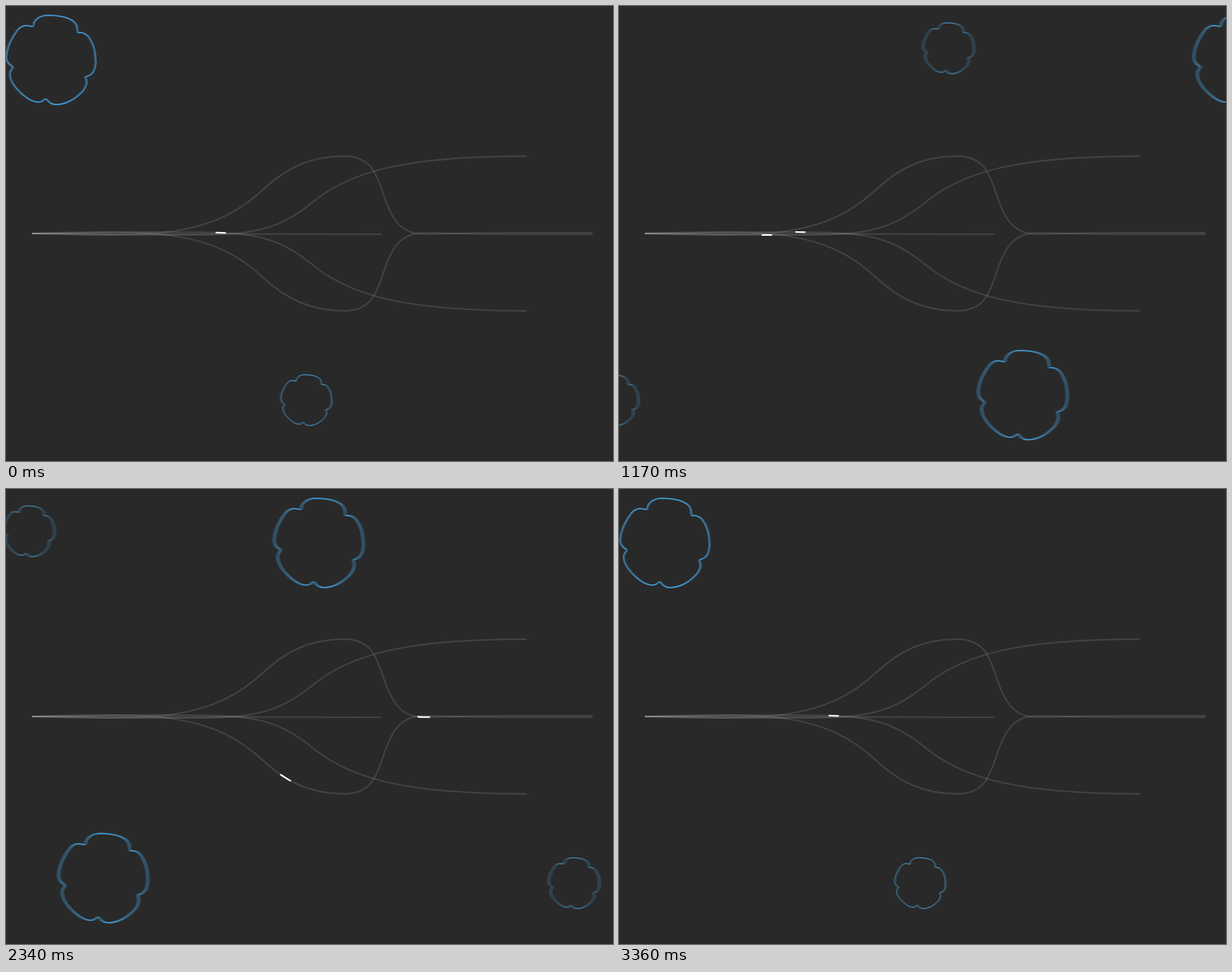
Animation, 800 px wide and 600 px high, one loop 3.39 s. Source, as an HTML page with a canvas:

```html
<!DOCTYPE html>
<html lang="en">
<head>
<meta charset="utf-8">
<title>Branching pulses</title>
<style>
html, body { margin: 0; width: 100%; height: 100%; overflow: hidden; background: #292929; }
canvas { display: block; width: 800px; height: 600px; }
</style>
</head>
<body>
<canvas id="stage" width="800" height="600"></canvas>
<script>
const ctx = document.getElementById('stage').getContext('2d');

const STEP = 30;          // ms per picture
const STEPS = 113;        // pictures per loop; the last pose equals the first
const SPAN = STEPS - 1;
const RUN = 30;           // steps a pulse needs for its track
const DASH = 0.02;        // pulse length as a share of its track
const SPEED = 10.362;     // blob drift in px per step
const WRAP = SPEED * SPAN;
const SHUTTER = 0.5;      // exposure in steps
const SAMPLES = 8;

// Mirror a track vertically about y = 300 by flipping every second number.
const flip = d => {
  let i = 0;
  return d.replace(/[\d.]+/g, n => i++ % 2 ? String(600 - n) : n);
};

const loopUp = 'M34 300 C200 305 272 305 340 241 C368 215 400 198 445 198 ' +
  'C478 198 487 216 497 247 C508 281 520 300.7 550 300.7 ' +
  'C590 300.7 600 299.2 660 299 L773 299';
const armUp = 'M34 300 C90 300.3 140 301.9 200 301.9 C315 301.9 350 303 405 258 ' +
  'C455 217 530 198 686 198';

function track(d, starts) {
  const el = document.createElementNS('http://www.w3.org/2000/svg', 'path');
  el.setAttribute('d', d);
  return { shape: new Path2D(d), length: el.getTotalLength(), starts };
}

const tracks = [
  track(loopUp, [9, 56]),
  track(flip(loopUp), [43, 65]),
  track(armUp, [32, 81]),
  track(flip(armUp), [30, 101]),
  track('M34 300 L495 301', [44, 82])
];

const blob = new Path2D(
  'M36.5 26.5 C37 19 44 12.5 56 12.3 C78 12.5 94.5 18 94.5 30 ' +
  'C94.5 33 94.8 35 96 35.2 C101 34.5 105 36 109 40 C116 49 119 62 118.7 75 ' +
  'C118 86 114 91 108 92.5 C105 93.3 104.7 94 106 96 C108 101 106.5 106 102 112 ' +
  'C93 122 80 130 67 130 C61 130 57.5 127.5 55 124 C53.5 122 52.5 122 50.5 124 ' +
  'C47.5 127 43.5 127.5 38 126 C28 123 14 111 8 99 C5 92 4.5 87 8 83.5 ' +
  'C10 81 10 80.5 8 79 C3 76 0.8 71 1.2 66 C2 53 10 39 16 31.5 ' +
  'C20 26.5 26 25 30 26 C34.5 27.2 36 27.5 36.5 26.5 Z');

const blobs = [
  { x: 0, y: 0, size: 1 },
  { x: 876.4, y: 442, size: 1 },
  { x: 804.3, y: 15.2, size: 0.57 },
  { x: 362.2, y: 479.2, size: 0.57 }
];

const mod = (a, n) => ((a % n) + n) % n;
const clamp = (v, lo, hi) => Math.min(hi, Math.max(lo, v));

// Motion blur: average several exposures by adding light to the background.
function drawBlobs(step) {
  ctx.save();
  ctx.globalCompositeOperation = 'lighter';
  ctx.globalAlpha = 1 / SAMPLES;
  ctx.strokeStyle = 'rgb(27,120,182)';
  ctx.lineWidth = 1.6;
  for (const { x, y, size } of blobs) {
    for (let i = 0; i < SAMPLES; i++) {
      const shift = ((i + 0.5) / SAMPLES - 0.5) * SHUTTER;
      const at = clamp(step + shift, 0, SPAN);
      ctx.save();
      ctx.translate(mod(x - SPEED * at + 200, WRAP) - 200, y);
      ctx.scale(size, size);
      ctx.stroke(blob);
      ctx.restore();
    }
  }
  ctx.restore();
}

function drawTracks(step) {
  ctx.lineWidth = 2;
  ctx.strokeStyle = 'rgba(255,255,255,0.12)';
  for (const t of tracks) ctx.stroke(t.shape);

  ctx.strokeStyle = '#fff';
  for (const { shape, length, starts } of tracks) {
    ctx.setLineDash([DASH * length, 2 * length]);
    for (const start of starts) {
      const age = mod(step - start, SPAN);
      if (age >= RUN) continue;
      ctx.lineDashOffset = -length * (1 - DASH) * age / RUN;
      ctx.stroke(shape);
    }
  }
  ctx.setLineDash([]);
}

function draw(ms) {
  const step = Math.floor(ms / STEP) % STEPS;
  ctx.fillStyle = '#292929';
  ctx.fillRect(0, 0, 800, 600);
  drawBlobs(step);
  drawTracks(step);
}

const begin = performance.now();
function tick() {
  draw(Math.max(0, performance.now() - begin));
  requestAnimationFrame(tick);
}
tick();
</script>
</body>
</html>
```
